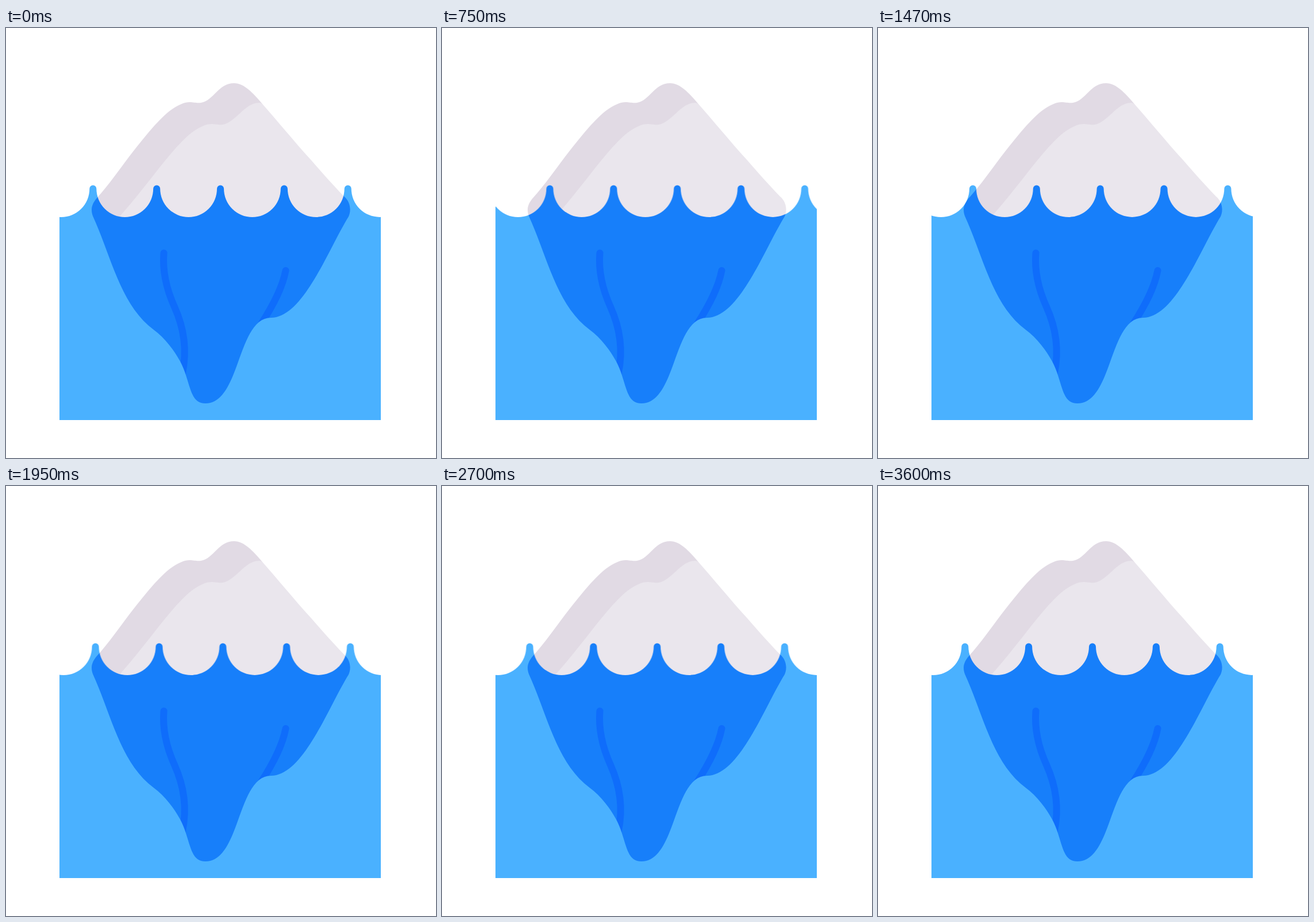
An HTML page that plays this animation: 748x748 px, repeating every 3.63 s.

```html
<!DOCTYPE html>
<html lang="en">
<head>
<meta charset="utf-8">
<title>Iceberg</title>
<style>
  html, body { margin: 0; width: 100%; height: 100%; overflow: hidden; background: #fff; }
  svg { display: block; width: 100%; height: 100%; }
  .wave { animation: sway 3630ms infinite; }
  /* there and back in 1800 ms each, then a 30 ms rest */
  @keyframes sway {
    0% { transform: translateX(0); animation-timing-function: cubic-bezier(.5, 0, .5, 1); }
    49.587% { transform: translateX(-219.7px); animation-timing-function: cubic-bezier(.5, 0, .5, 1); }
    99.174%, 100% { transform: translateX(0); }
  }
</style>
</head>
<body>
<svg viewBox="0 0 748 748">
  <defs>
    <clipPath id="sea"><rect x="93.5" y="260" width="558.3" height="421.8"/></clipPath>
    <clipPath id="berg">
      <path d="M151 327C147 316 149 307 157 297C181 270 195 249 214 224
        C236 196 262 162 285 144C300 133 311 129 319 129C328 129 331 131 339 130
        C362 126 369 96 397 96C415 96 432 116 445 131C470 159 500 196 531 230
        C552 254 566 270 588 293C599 302 601 317 596 328C560 386 517 504 461 504
        C402 504 408 653 347 653C318 653 322 616 303 580C292 560 277 540 257 525
        C199 482 183 397 151 327Z"/>
    </clipPath>
  </defs>

  <g clip-path="url(#sea)"><path class="wave" fill="#4ab1ff"/></g>

  <g clip-path="url(#berg)">
    <rect x="140" y="90" width="470" height="250" fill="#e1dae4"/>
    <path fill="#eae6ed" d="M187 341L195 331C219 304 231 288 252 262C274 234 300 200 323 182
      C338 171 349 167 357 167C366 167 369 169 377 168C400 164 414 131 440 130
      C443 130 445 131 448 134L620 134V341Z"/>
    <path class="wave" fill="#177ffa"/>
    <g fill="none" stroke="#0f6dfb" stroke-width="12" stroke-linecap="round">
      <path d="M274.5 391.5C272 423 279 454 293 485C308 518 316 556 307 600"/>
      <path d="M486.5 422C481 451 466 480 445 513"/>
    </g>
  </g>
</svg>
<script>
  // One crest cap followed by one round trough, 110.85 px in all
  const swell = 'a6 6 0 0 1 12 0a49.425 49.425 0 0 0 98.85 0';
  const d = `M34.45 279.5${swell.repeat(9)}V690H34.45Z`;
  document.querySelectorAll('.wave').forEach(wave => wave.setAttribute('d', d));
</script>
</body>
</html>
```
